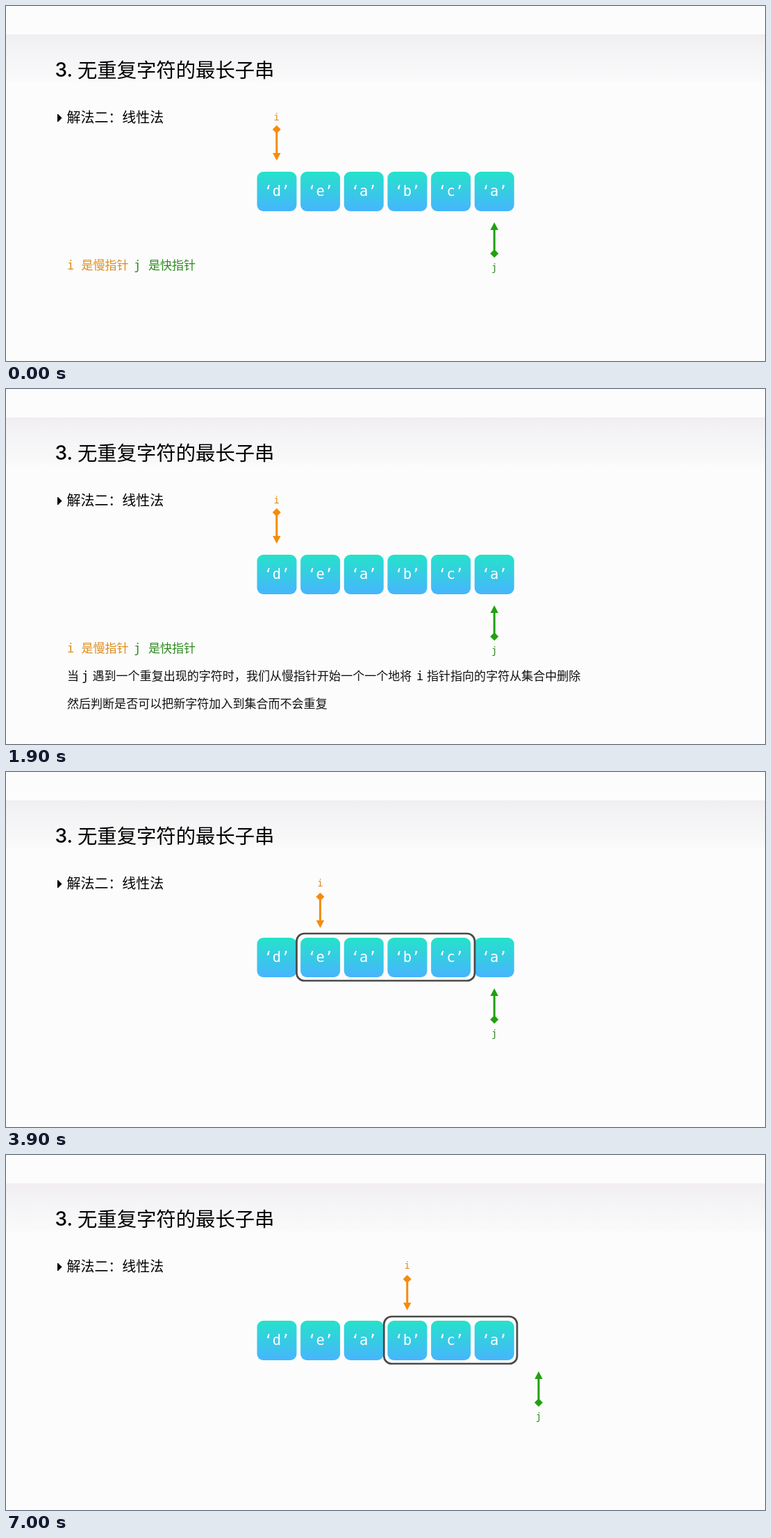
An HTML page that plays this animation: 1093 by 512 pixels, repeating every 7.1 s.

```html
<!DOCTYPE html>
<html lang="zh-CN">
<head>
<meta charset="utf-8">
<style>
  html, body { margin: 0; width: 100%; height: 100%; overflow: hidden; background: #fcfcfc; }
  svg { display: block; width: 1093px; height: 512px; }
  text { font-family: "Noto Sans CJK SC", "Noto Sans CJK", sans-serif; font-size: 17.05px; }
  .mono { font-family: "DejaVu Sans Mono", monospace; }
  .heading { font-weight: 500; }
  .light { font-weight: 300; fill: #111; }
  .orange { fill: #dd8c1c; }
  .green { fill: #2c8a1c; }
  .label { font-size: 14px; text-anchor: middle; }
  .letter { font-size: 20.5px; text-anchor: middle; fill: #fff; }
</style>
</head>
<body>
<svg viewBox="0 0 1093 512">
  <defs>
    <linearGradient id="band" x2="0" y2="1">
      <stop stop-color="#f0eef0"/>
      <stop offset=".25" stop-color="#f3f2f4"/>
      <stop offset=".9" stop-color="#f9f9fa"/>
      <stop offset="1" stop-color="#fcfcfc"/>
    </linearGradient>
    <linearGradient id="tile" x2="0" y2="1">
      <stop stop-color="#25e2ca"/>
      <stop offset="1" stop-color="#47b5fd"/>
    </linearGradient>
  </defs>
  <rect width="1093" height="512" fill="#fcfcfc"/>
  <rect y="41" width="1093" height="71" fill="url(#band)"/>

  <text class="heading" x="70.5" y="102" style="font-family:Inter,sans-serif;font-size:28px">3.</text>
  <text class="heading" x="103" y="102.5" style="font-size:28.35px">无重复字符的最长子串</text>
  <path d="M74.5 156v11l5.5-5.5z" stroke="#000" stroke-linejoin="round"/>
  <text class="heading" x="87.5" y="168" style="font-size:19.95px">解法二：线性法</text>

  <g id="legend">
    <text class="mono orange" x="88" y="380">i</text>
    <text class="orange" x="108.5" y="380">是慢指针</text>
    <text class="mono green" x="184" y="380">j</text>
    <text class="green" x="205" y="380">是快指针</text>
  </g>
  <g id="rule">
    <text class="light" x="88" y="420">当</text>
    <text class="mono" x="109" y="420">j</text>
    <text class="light" x="124.5" y="420">遇到一个重复出现的字符时，我们从慢指针开始一个一个地将</text>
    <text class="mono" x="591" y="420">i</text>
    <text class="light" x="606" y="420">指针指向的字符从集合中删除</text>
  </g>
  <text id="check" class="light" x="88" y="459.5">然后判断是否可以把新字符加入到集合而不会重复</text>

  <g id="tiles"></g>
  <rect id="frame" y="233" height="68" rx="11" fill="none" stroke="#4a4a4a" stroke-width="2.7"/>

  <g id="slow">
    <text id="slowLabel" class="mono label orange" y="165">i</text>
    <path id="slowArrow" fill="#f68b0b" d="M0 172l6 6-4.5 4.5V212H5.7L0 223-5.7 212H-1.5V182.500L-6 178z"/>
  </g>
  <g id="fast">
    <path fill="#22a010" d="M0 363l6-6-4.500-4.500V323H5.700L0 312-5.700 323H-1.500V352.500L-6 357z"/>
    <text class="mono label green" y="382">j</text>
  </g>
</svg>
<script>
  const LOOP = 7100, STEP = 62.65;
  const $ = id => document.getElementById(id);

  $('tiles').innerHTML = [...'deabca'].map((letter, n) => {
    const x = 361.5 + n * STEP;
    return `<rect x="${x}" y="239" width="57" height="57" rx="9" fill="url(#tile)"/>
      <text class="mono letter" x="${x + 28.5}" y="274">‘${letter}’</text>`;
  }).join('');

  // Smoothed progress from 0 to 1 between two times
  function ease(t, start, end) {
    const p = Math.min(1, Math.max(0, (t - start) / (end - start)));
    return p * p * (3 - 2 * p);
  }

  const fade = (id, value) => $(id).setAttribute('opacity', value);
  const move = (id, x, y = 0) => $(id).setAttribute('transform', `translate(${x} ${y})`);

  function draw(t) {
    const textOut = 1 - ease(t, 2900, 3400);
    fade('legend', textOut);
    fade('rule', ease(t, 100, 700) * textOut);
    fade('check', ease(t, 1300, 1900) * textOut);
    fade('frame', ease(t, 1900, 2250));

    const first = ease(t, 3200, 3800);
    const second = ease(t, 3950, 4550);
    const third = ease(t, 4600, 5200);
    const steps = first + second + third;
    const advance = ease(t, 5800, 6500);

    move('slow', 389.8 + steps * STEP);
    move('slowArrow', 0, 2 * first - second);
    move('slowLabel', 0, -second);
    move('fast', 703.2 + advance * 63.8);

    const left = 355.6 + steps * 62.9;
    $('frame').setAttribute('x', left);
    $('frame').setAttribute('width', 675 + advance * 61 - left);
  }

  function tick() {
    draw(performance.now() % LOOP);
    requestAnimationFrame(tick);
  }
  tick();
</script>
</body>
</html>
```
